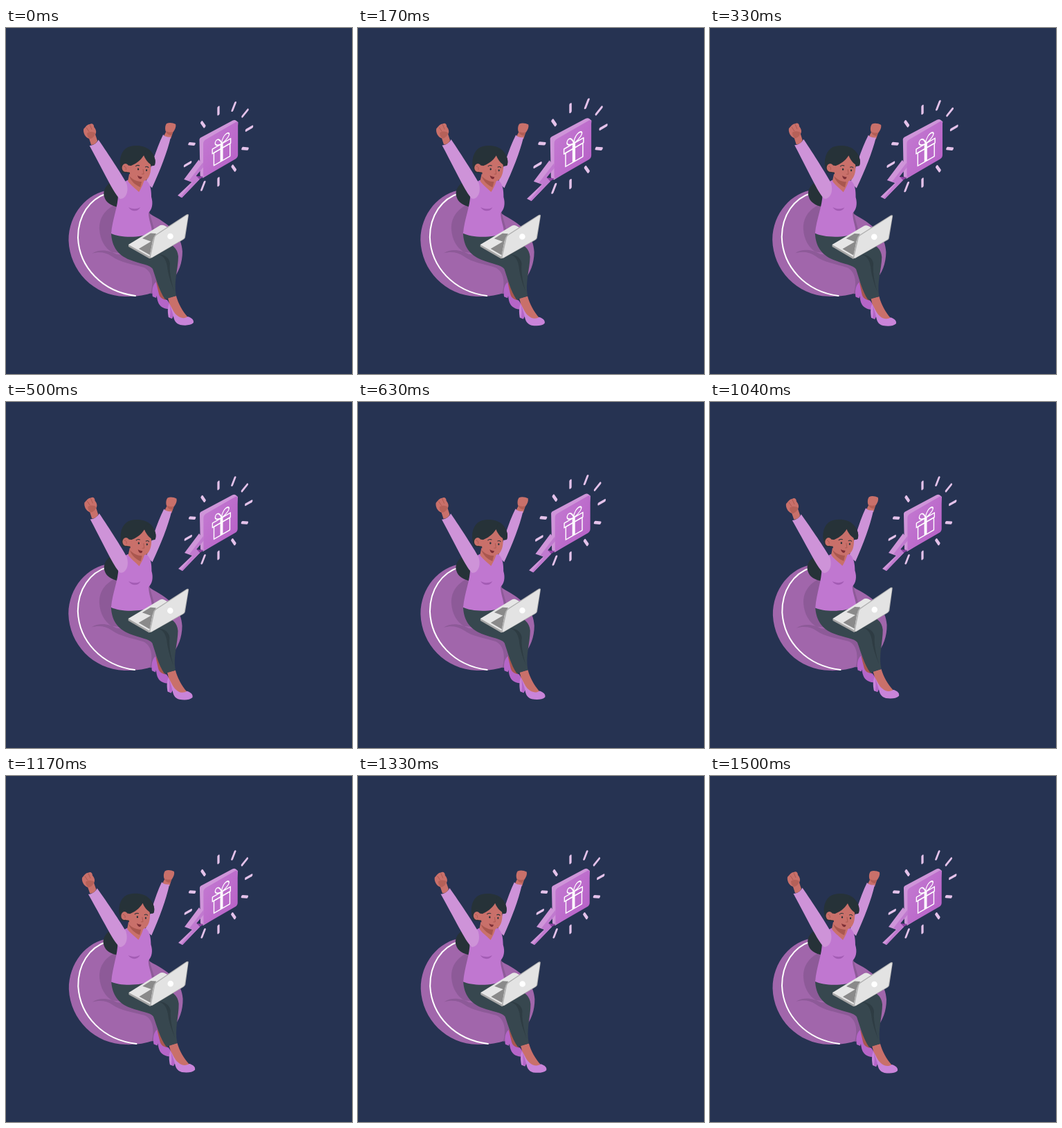
Animation, 500 px wide and 500 px high, one loop 1.54 s. Source, as an HTML page:

```html
<!DOCTYPE html>
<html lang="en">
<head>
<meta charset="utf-8">
<title>Gift notification</title>
<style>
html, body { margin: 0; width: 100%; height: 100%; overflow: hidden; background: #263352; }
svg { display: block; width: 100vw; height: 100vh; }
.skin { fill: #c9706a; }
.skin2 { fill: #a9574f; }
.hair { fill: #263238; }
.sleeve { fill: #ce93d8; }
.top { fill: #c077d0; }
.fold { fill: #a35cb4; }
.bag { fill: #a166ab; }
.bag2 { fill: #8d5a98; }
.pants { fill: #37474f; }
.pants2 { fill: #2e3c43; }
.shoe { fill: #c984d9; }
.shoe2 { fill: #b565c8; }
.side { fill: #cf95d9; }
.line { fill: none; stroke: #fff; stroke-linejoin: round; stroke-linecap: round; }
.ink { fill: none; stroke: #263238; }
.crease { fill: none; stroke: #a9574f; stroke-width: .9; }
</style>
</head>
<body>
<svg viewBox="0 0 500 500">
  <defs>
    <linearGradient id="panel" x2="1" y2="1">
      <stop offset="0" stop-color="#c277d0"/>
      <stop offset="1" stop-color="#b863c8"/>
    </linearGradient>
  </defs>

  <g id="woman">
    <!-- beanbag -->
    <path class="bag" d="M150 234C117 238 90.500 269 90.500 307C92 351 127 387 172 388C201 389 224 381 239 366C250 354 255 339 255 323C254 301 239 285 212 271L180 250Z"/>
    <path class="bag2" d="M163 253C145 260 134 273 135 291C136 306 143 318 153 324L216 330L214 290L206 262Z"/>
    <path class="bag2" d="M124 326C136 318 151 322 160 327L214 332L240 340L231 373C223 380 216 383 209 384C214 367 211 351 199 346C183 341 165 339 153 330C145 324 134 323 124 326Z"/>
    <path class="line" stroke-width="2" d="M146 239C121 247 104 271 104 303C106 346 139 381 187 387"/>

    <path class="hair" d="M158 220C146 224 139 234 142 244C144 252 152 257 163 259L170 232Z"/>

    <!-- far foot -->
    <path class="skin2" d="M217 366L229 388L234 397L226 398L219 386Z"/>
    <path class="shoe2" d="M217 367C211 372 211 381 212 388L217 390L218 387C219 396 221 402 229 405C234 407 238 406 240 403L233 393C228 393 222 390 221 384Z"/>
    <!-- near foot -->
    <path class="skin" d="M234 390L246 387C249 398 255 409 263 418L255 422C247 419 240 409 237 401Z"/>
    <path class="shoe" d="M236 398C233 405 234 412 235 418L240 420L242 416C243 422 245 427 252 429C259 430 267 430 271 426C272 422 269 419 263 417C259 420 252 420 247 415C242 411 240 404 236 398Z"/>
    <path class="shoe2" d="M236 398C239 405 241 412 242 416L240 420L237 418C238 411 238 404 236 398Z"/>

    <!-- legs -->
    <path class="pants" d="M152 297C153 315 161 328 179 335C194 341 208 342 212 348C217 362 221 379 230 392L246 387C242 367 249 348 249 330C248 318 240 312 228 309L209 296Z"/>
    <path class="pants2" d="M219 327C227 328 231 334 233 344C234 356 239 370 243 380C238 364 236 349 237 340C236 331 227 326 219 327Z"/>

    <!-- raised arms -->
    <path class="skin" d="M228 156L231 150C229 146 230 140 232 138C236 136 241 137 245 139C246 143 244 147 241 151L238 160Z"/>
    <path class="skin2" d="M231 149C234 151 238 151 241 150L239 155C235 155 232 153 231 149Z" opacity=".7"/>
    <path class="sleeve" d="M227 154C229 157 234 158 238 157.500C233 179 223 205 211 231L202 223C209 204 216 176 227 154Z"/>

    <!-- torso -->
    <path class="top" d="M178 219C169 222 163 229 162 240C162 258 154 275 152 297C164 303 194 304 211 296C211 286 206 278 206 267C211 262 213 254 210 244C210 235 209 224 202 220Z"/>
    <path class="fold" d="M177 259C183 262 189 262 194 259C191 266 181 266 177 259Z"/>
    <path class="skin" d="M178 211L201 214L199 222C197 228 195 232 192 237C186 231 179 226 176 221Z"/>
    <path class="skin2" d="M178 214C184 220 190 222 196 222L194 230C187 227 181 222 178 214Z"/>
    <path class="sleeve" d="M120.500 170C126 170 131 166 133.500 161.500C149 184 166 210 174 224C178 237 173 247 165 247C157 241 146 217 120.500 170Z"/>
    <path class="skin" d="M123 169L120 160C114 158 111 151 112 146C115 143 117 139 121 139C124 137 127 139 127 143C130 147 131 150 129 154L132 163C130 167 127 169 123 169Z"/>
    <path class="skin2" d="M117 152C121 149 126 150 129 152C128 157 124 160 121 160C118 158 117 155 117 152Z" opacity=".6"/>
    <path class="crease" d="M116 144L120 150M121 140L124 147"/>

    <!-- head -->
    <path class="hair" d="M168 209C162 197 164 181 173 174C181 168 198 169 206 175C214 181 217 191 215 198C212 200 209 200 206 198L180 210Z"/>
    <path class="skin" d="M178 200C187 197 194 192 199 184C205 186 208 192 209 198C210 208 207 217 202 220C195 224 184 219 179 211Z"/>
    <path class="hair" d="M199 184C202 192 208 198 214 199C219 190 211 178 202 175Z"/>
    <ellipse class="skin" cx="172.500" cy="202" rx="5" ry="6"/>
    <path class="skin" d="M172 198L180 199L182 209L174 208Z"/>
    <path class="crease" d="M170 200C173 200 174 203 173 205M198 204L199 211L196 211"/>
    <ellipse class="hair" cx="191" cy="204" rx="1.200" ry="1.500"/>
    <ellipse class="hair" cx="203" cy="205.500" rx="1.100" ry="1.500"/>
    <path class="ink" d="M187 200C189 198 191 198 193 199M201 201C203 200 205 200 206 202"/>
    <path fill="#7d2f36" d="M190 213C192 214.500 194 215 196.500 215C196 220 191 219 190 213Z"/>

    <!-- laptop -->
    <path fill="#a6a6a6" d="M177 313V316L207 333L211 332L246 302Z"/>
    <path fill="#e6e6e6" d="M177 313L223 285Q226 284 229 285.500L248 296L209 331Z"/>
    <path fill="#8a8a8a" d="M197 304L209 296.500L217 297L211 309ZM192 319L212 307L208 328Z"/>
    <path fill="#b0b0b0" d="M207 333L213 303Q214 300 217 298L260 270Q263 268 264 270L259 303Q258 305 256 306L211 332Z"/>
    <path fill="#e3e3e3" d="M209 331L215 303Q215.500 300.500 218 299L261 270.500Q263 269.500 263 272L258 302Q257.700 304 256 305L212 331Q209 332.500 209 331Z"/>
    <circle cx="237.500" cy="301" r="4.300" fill="#fff"/>
  </g>

  <g id="bubble">
    <path class="side" d="M280 163Q279.500 160 282 158.500L327 134.500Q330 133 332 134.500L335 137L330 187L285 216L281 213Z"/>
    <path fill="#8f43a3" d="M274 213L286 214L277 220Z"/>
    <path class="side" d="M279 190L258 218L269 222L249 241L255 244L280 218L275 213L286 199Z"/>
    <path fill="#c07acf" d="M285 194L265 220L270 222L253 243L255 244L280 218L275 213L286 200Z"/>
    <!-- everything here lies flat in the tilted plane -->
    <g transform="matrix(.866 -.5 0 1 307 171)">
      <g id="rays" fill="#e4c2ea"></g>
      <rect x="-25" y="-20" width="57" height="52" rx="4" fill="url(#panel)"/>
      <g class="line" stroke-width="1.600">
        <rect x="-10" y="-1" width="30" height="6.500"/>
        <rect x="-7.500" y="5.500" width="26.500" height="18"/>
        <path stroke-width="4.500" stroke-linecap="butt" d="M5.200 -1V23.500"/>
        <path d="M5.200 -1C-3 -1 -8 -6 -4 -10C0 -12 4 -6 5.200 -1C5 -8 11 -13 16 -11C21 -8 14 -2 5.200 -1"/>
      </g>
    </g>
  </g>
</svg>
<script>
const LOOP = 1540, FRAMES = 37, CYCLE = 1500, LEAD = 25;
const [woman, bubble, rays] = ['woman', 'bubble', 'rays'].map(id => document.getElementById(id));

// Twelve rays on a clock face; the speech tail takes the place of the ninth.
for (let hour = 0; hour < 12; hour++) {
  if (hour === 8) continue;
  rays.innerHTML += `<rect x="-1.9" y="-57" width="3.8" height="13" rx="1.6" transform="rotate(${hour * 30})"/>`;
}

// Triangle wave from -1 to 1, starting at 0.
const sway = p => Math.asin(Math.sin(p * 2 * Math.PI)) * 2 / Math.PI;

// Straight rise to 1 at the peak, then a straight fall.
const spike = (p, peak, fall) => Math.max(0, 1 - (p < peak ? (peak - p) / .1 : (p - peak) / fall));
const beat = p => 1 + .1 * (spike(p, .1, .2) + spike(p, .5, .1));

function draw(now) {
  const step = Math.floor((now % LOOP) / LOOP * FRAMES);
  const p = Math.min(1, (step * LOOP / FRAMES + LEAD) / CYCLE);
  woman.setAttribute('transform', `rotate(${sway(p)} 180 283)`);
  bubble.setAttribute('transform',
    `translate(306.5 175.5) scale(${beat(p)}) translate(-306.5 -175.5)`);
}

const start = performance.now();
function tick() {
  draw(performance.now() - start);
  requestAnimationFrame(tick);
}
tick();
</script>
</body>
</html>
```
